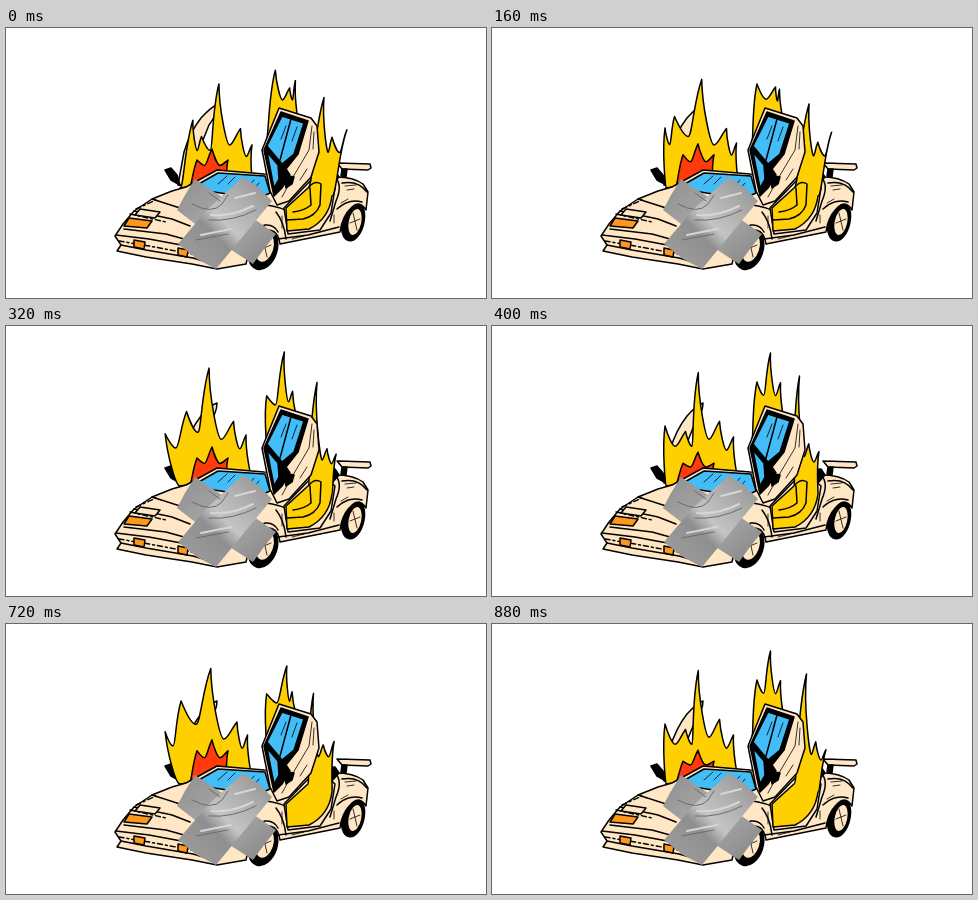
These frames come from a looping animation (480x270 px, 960 ms). An HTML page:

```html
<!DOCTYPE html>
<html lang="en">
<head>
<meta charset="utf-8">
<title>Burning car</title>
<style>
  html, body { margin: 0; width: 100%; height: 100%; overflow: hidden; background: #fff; }
  svg { display: block; width: 480px; height: 270px; }
  path, ellipse { stroke: #000; stroke-width: 1.5; stroke-linejoin: round; stroke-linecap: round; }
  .cream { fill: #ffe7c5; }
  .blue { fill: #42bdf8; }
  .yellow { fill: #ffd000; }
  .red { fill: #ff3b0c; }
  .orange { fill: #ff971c; }
  .line { fill: none; }
  .thin { fill: none; stroke-width: .8; }
  .tape path { stroke: none; }
  .tape .crease { fill: none; stroke: #6c6c6c; stroke-width: 1; }
  .tape .shine { fill: none; stroke: #d6d6d6; stroke-width: 2; }
</style>
</head>
<body>
<svg viewBox="0 0 480 270">
  <defs>
    <linearGradient id="tapeA" x1="0" y1="0" x2="1" y2="1">
      <stop offset="0" stop-color="#8f8f8f"/><stop offset=".5" stop-color="#aaa"/>
      <stop offset="1" stop-color="#858585"/>
    </linearGradient>
    <linearGradient id="tapeB" x1="1" y1="0" x2="0" y2="1">
      <stop offset="0" stop-color="#8d8d8d"/><stop offset=".3" stop-color="#b0b0b0"/>
      <stop offset=".5" stop-color="#c4c4c4"/><stop offset=".62" stop-color="#8f8f8f"/>
      <stop offset="1" stop-color="#a0a0a0"/>
    </linearGradient>
  </defs>

  <path id="back" class="yellow"/>

  <!-- far door and mirror -->
  <path class="cream" d="M172 157L178 124Q184 104 195 90Q205 79 211 77Q211 87 203 97L193 122L184 158Z"/>
  <path d="M159 142L165 140L171 147L174 157L165 152Z"/>
  <path id="left" class="yellow"/>
  <path id="red" class="red"/>

  <!-- rear wing, wheels and body -->
  <path class="cream" d="M331 135L364 136L365 140L362 142L336 141Z"/>
  <path d="M336 141L341 141L340 149L335 148Z"/>
  <ellipse cx="347" cy="193" rx="11" ry="20" transform="rotate(12 347 193)"/>
  <ellipse cx="257" cy="221" rx="14" ry="21" transform="rotate(18 257 221)"/>
  <path class="cream" d="M109 208L117 196L128 183L146 171L166 163L180 159L211 142L258 146L318 148L331 149Q347 149 357 156L362 164L360 182Q354 172 346 179Q336 188 334 204L274 216Q272 202 262 202Q246 206 240 236L211 241L186 236L140 229L111 223L115 217Z"/>
  <ellipse class="cream" cx="349" cy="194" rx="7" ry="14" transform="rotate(12 349 194)"/>
  <ellipse class="cream" cx="259" cy="220" rx="9" ry="15" transform="rotate(18 259 220)"/>
  <path class="thin" d="M347 185L351 202M344 195L354 191M257 211L261 229M253 222L265 217"/>

  <!-- windscreen, bonnet and nose -->
  <path class="blue" d="M184 161L212 145L259 148L264 165L249 172Q216 164 184 161Z"/>
  <path class="thin" d="M221 148L212 156M229 149L222 156M248 152L242 159M253 155L249 160"/>
  <path class="line" d="M110 207L143 211L186 219M115 217L140 222L187 230L211 237M128 183L166 191L184 198M146 171L174 180M118 201L160 206L178 211M236 178Q258 173 282 183"/>
  <path class="line" stroke-dasharray="5 3 2 3" d="M113 213L143 218L186 226M124 186L160 194M130 181L150 172"/>
  <path class="cream" d="M134 181L154 184L149 190L129 187Z"/>
  <path class="orange" d="M123 190L146 193L141 200L118 198Z"/>
  <path class="orange" d="M128 212L139 214L138 221L128 219ZM172 220L182 222L181 229L172 227Z"/>

  <!-- flank -->
  <path d="M317 144L329 143L333 149L325 158L318 155Z"/>
  <path class="line" d="M329 149Q337 157 330 173L324 193M272 211L302 207L333 199M270 184Q278 194 280 211M336 155Q352 152 361 164M331 181Q343 170 356 174M240 229Q241 203 259 197Q268 196 272 204"/>
  <path class="thin" d="M339 158L350 157M341 162L348 161M335 175L342 171M286 211L298 208M328 187L328 195M276 188L276 200"/>

  <g class="tape">
    <path fill="url(#tapeA)" d="M189 151L222 173L270 206L258 221L247 236L210 212L171 182L179 167Z"/>
    <path fill="url(#tapeB)" d="M237 149L252 159L266 173L238 207L210 241L191 231L172 216L201 182Z"/>
    <path class="shine" d="M205 187Q225 189 247 178M229 170L249 165M195 207L225 201"/>
    <path class="crease" d="M186 176Q206 187 216 176L222 167M203 192Q226 194 250 182M190 212L222 206M203 165L214 173"/>
  </g>

  <!-- cabin -->
  <path class="cream" d="M278 180L306 151L319 151L329 160L325 185L314 202L282 206Z"/>
  <path id="right" class="yellow"/>
  <path id="seat" class="line" d="M303 159Q309 152 315 156L314 177Q310 188 297 191L281 192M304 160L305 177Q298 183 287 184"/>

  <!-- near door -->
  <path class="cream" d="M273 80L305 90L311 98L313 124L305 149L283 173L271 177L264 163L256 122Z"/>
  <path d="M275 84L302 93L292 126L280 141L284 147L276 160L268 168L258 122Z"/>
  <path class="blue" d="M276 88L298 95L288 126L276 136L261 118Z"/>
  <path class="blue" d="M261 124L272 137L273 151L268 160Z"/>
  <path class="line" d="M285 91L274 132"/>
  <path class="thin" d="M291 99L286 113M280 98L275 111M306 98L303 122L287 149L276 169M308 104L307 121M301 141L294 152"/>
  <path d="M279 153Q284 147 288 149L286 156L280 160Z"/>
</svg>
<script>
const STEP = 80, LOOP = 960, TURN = 2 * Math.PI;
const $ = id => document.getElementById(id);

// A tongue's tip swings about (x, y) by (dx, dy); phase is in degrees.
const tongue = (x, y, dx, dy, phase) => ({ x, y, dx, dy, phase: phase * TURN / 360 });

const flames = {
  left: {
    from: [174, 160], to: [246, 150], floor: 155, lean: 0,
    tongues: [tongue(173, 100, 16, -9, -30), tongue(188, 97, 13, 20, -55), tongue(208, 49, 5, 7, -10),
              tongue(231, 98, 4, 3, 30), tongue(243, 113, 3, 4, 0)]
  },
  back: {
    from: [260, 112], to: [294, 100], floor: 100, lean: 0,
    tongues: [tongue(265, 56, 5, -16, -30), tongue(281, 43, 3, 19, 27), tongue(288, 59, 2, -9, -45)]
  },
  right: {
    from: [302, 160], to: [326, 168], floor: 160, lean: 7, tail: "Q323 191 303 201L281 203L280 180",
    tongues: [tongue(311, 63, 0, 13, 60), tongue(320, 116, -1, -7, -15), tongue(332, 115, 2, -14, 20)]
  },
  red: {
    from: [183, 160], to: [220, 150], floor: 150, lean: 0,
    tongues: [191, 206, 222].map((x, i) => tongue(x, i === 1 ? 121 : 132, 0, 6, -90))
  }
};

// Curve between a valley and a tip: round below, slender and bent above.
function edge([vx, vy], [tx, ty], up) {
  const dx = tx - vx, h = vy - ty, bend = -h * .06;
  const low = `${vx + dx * .3} ${vy}`, high = `${tx - dx * .35 + bend} ${ty + h * .4}`;
  return up ? `C${low} ${high} ${tx} ${ty}` : `C${high} ${low} ${vx} ${vy}`;
}

function outline({ from, to, floor, lean, tail = "", tongues }, pose) {
  const tips = tongues.map(t => {
    const swing = Math.cos(TURN * pose / 3 - t.phase);
    return [t.x + t.dx * swing + lean * Math.cos(TURN * pose / 6), t.y + t.dy * swing];
  });
  let valley = from, d = `M${from}`;
  tips.forEach((tip, i) => {
    const next = tips[i + 1];
    d += edge(valley, tip, true);
    if (next) {
      const low = Math.max(tip[1], next[1]);
      valley = [(tip[0] + next[0]) / 2, low + (floor - low) * .3];
    } else valley = to;
    d += edge(valley, tip, false);
  });
  return d + tail + "Z";
}

function draw(step) {
  const pose = (Math.max(step, 1) - 1) / 2;
  for (const id in flames) $(id).setAttribute("d", outline(flames[id], pose));
  // Fire hides the seat in the second half.
  $("seat").style.visibility = step < LOOP / STEP / 2 ? "visible" : "hidden";
}

const start = performance.now();
let shown = 0;
function tick() {
  const step = Math.floor(((performance.now() - start) % LOOP) / STEP);
  if (step !== shown) draw(shown = step);
  requestAnimationFrame(tick);
}
draw(0);
requestAnimationFrame(tick);
</script>
</body>
</html>
```
